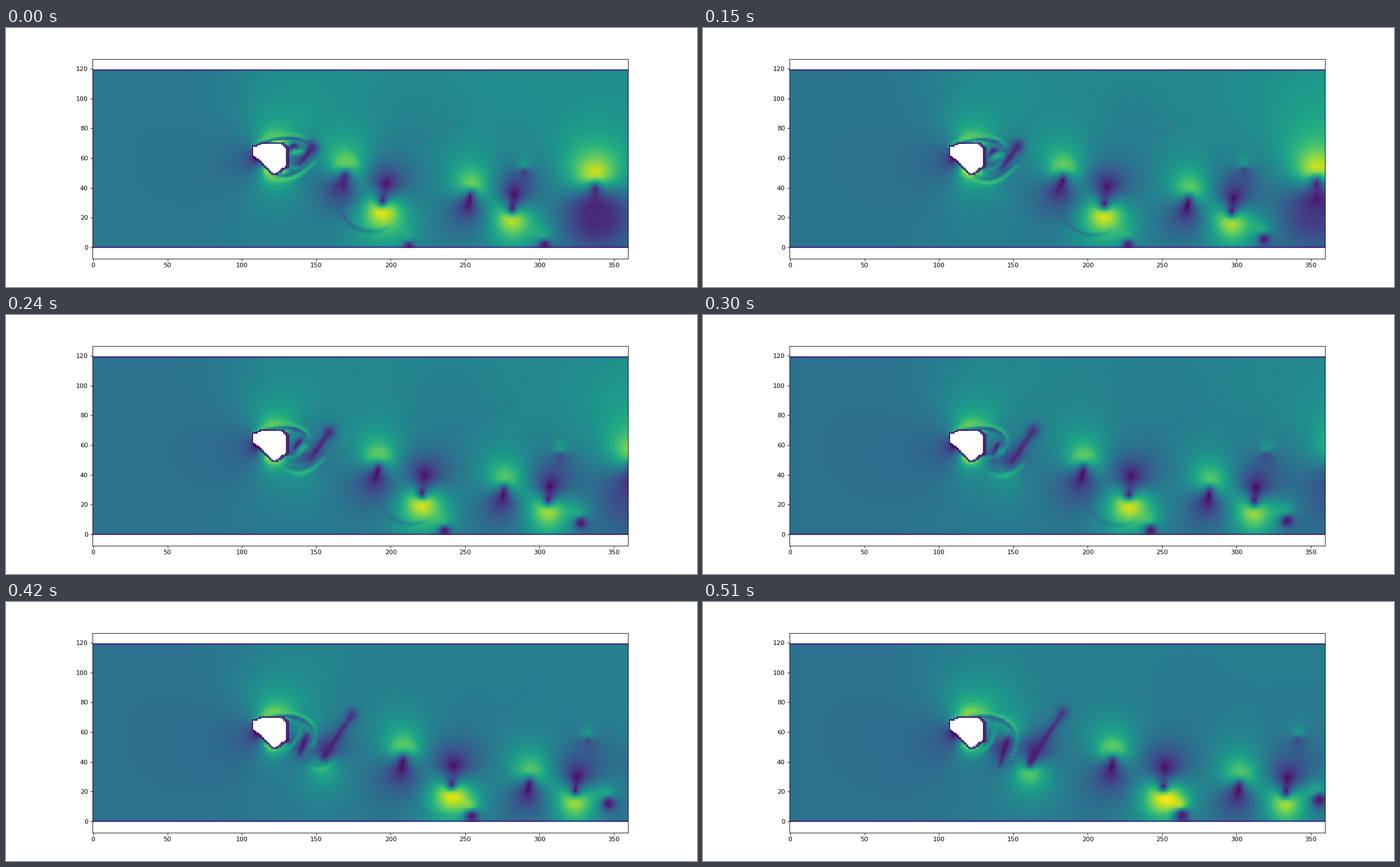
Animation, 1222 px wide and 458 px high, one loop 540 ms. Source, as a matplotlib script:

```python
import math
import numpy as np
import matplotlib.pyplot as plt
from matplotlib.animation import FuncAnimation
from matplotlib.path import Path

NX, NY, FRAMES, STEP = 360, 120, 18, 30
W, H, DPI = 1222, 458, 80
X, Y = np.meshgrid(np.arange(NX, dtype=float), np.arange(NY, dtype=float))

BODY = Path([(107.4, 67), (114.5, 69.6), (125.5, 69.6), (129.6, 65.7),
             (129.6, 55), (121.7, 49.3), (107.4, 62.3)])
SOLID = BODY.contains_points(np.c_[X.ravel(), Y.ravel()]).reshape(X.shape)
RIM = np.any([np.roll(SOLID, (dy, dx), (0, 1))
              for dx in (-1, 0, 1, 2) for dy in (-1, 0, 1)], axis=0)

# spin at start and end, core radius, x, y, drift per step
UPPER = (-1.0, -1.0, 6.8, 170, 51, 2.76, -0.44)
LOWER = (1.45, 1.6, 7, 194, 29, 3.32, -0.46)
VORTICES = [
    UPPER, LOWER,
    (-1.0, -1.0, 6.8, 254, 37.5, 2.82, -0.6),
    (1.3, 1.35, 6.8, 281, 23.5, 3.03, -0.38),
    (-1.45, 0, 8, 337, 42, 3.3, 0.9),
    (-0.4, -0.4, 2.5, 289.5, 53, 3.03, 0.25),
    (-0.2, -0.8, 3, 212, 4, 3, 0.2),
    (-0.4, -0.6, 3.5, 303, 5, 3.05, 0.75),
    (0.1, 1.1, 6, 124.5, 56.5, 2.14, -1.1),
    (0, -0.7, 6, 130, 60, 1.03, -0.15),
    (-0.1, -0.3, 11, 121, 58, 0, 0),
]


def mix(p, a, b):
    return a + (b - a) * p


def sigmoid(z):
    return 1 / (1 + np.exp(-z))


def centre(t, vortex):
    x, y, vx, vy = vortex[3:]
    return x + vx * t, y + vy * t


def blend(field, level, weight):
    field += (level - field) * weight


def blob(field, level, x, y, radius, alpha):
    r2 = (X - x)**2 + (Y - y)**2
    blend(field, level, max(alpha, 0) * np.exp(-r2 / radius**2))


def arc(field, level, x, y, radius, angle, width, alpha):
    """Soft arc around (x, y), strongest at the given angle."""
    off = np.hypot(X - x, Y - y) - radius
    turn = np.cos(np.arctan2(Y - y, X - x) - math.radians(angle))
    fade = np.clip(turn, 0, 1) ** 0.8
    blend(field, level, alpha * fade * np.exp(-off**2 / (2 * width**2)))


def stroke(field, pts, level, width, alpha):
    """Tapered Bezier stroke."""
    n = len(pts) - 1
    s = np.linspace(0, 1, 36)[:, None]
    line = sum(math.comb(n, k) * s**k * (1 - s)**(n - k) * q
               for k, q in enumerate(pts))
    x0, y0 = np.maximum(line.min(0) - 4 * width, 0).astype(int)
    x1, y1 = (line.max(0) + 4 * width).astype(int) + 1
    box = np.s_[y0:y1, x0:x1]
    r2 = ((X[box][..., None] - line[:, 0])**2
          + (Y[box][..., None] - line[:, 1])**2)
    taper = np.sin(np.pi * (0.06 + 0.88 * s[:, 0])) ** 0.4
    blend(field[box], level,
          alpha * (taper * np.exp(-r2 / (2 * width**2))).max(-1))


def velocity(t):
    # flow around the body, open towards the wake
    dx, dy = X - 121, Y - 60
    dx = np.where(dx > 0, dx / 1.5, dx)
    r2 = np.maximum(dx**2 + dy**2, 100)
    cos2, sin2 = (dx**2 - dy**2) / r2, 2 * dx * dy / r2
    side = np.maximum(-cos2, 0)
    u = 1 + 170 / r2 * np.where(dx > 0, side, np.maximum(-cos2, -0.75 * cos2))
    v = -130 / r2 * sin2 * np.where(dx > 0, side, 1)
    grow = (t / (FRAMES - 1)) ** 2
    for vortex in VORTICES:
        s0, s1, core = vortex[:3]
        cx, cy = centre(t, vortex)
        dx, dy = X - cx, Y - cy
        r2 = dx**2 + dy**2
        swirl = mix(grow, s0, s1) * 2 * core / (core**2 + r2)
        swirl *= np.exp(-r2 / (4.7 * core)**2)
        u -= swirl * dy
        v += swirl * dx
    return u, v * (1 - np.exp(-Y / 6))


def near_wake(field, p):
    """Shear layers rolling up behind the body, p from 0 to 1."""
    def morph(a, b):
        return mix(p, np.array(a, dtype=float), np.array(b, dtype=float))

    blob(field, 0.35, mix(p, 139, 142), 59, 9, mix(p, 0.8, 0.3))

    slash = morph([(138, 56), (143, 61), (147, 67)],
                  [(161, 38), (165, 47), (183, 73)])
    eye = morph([(132, 66), (135, 70), (137, 67)],
                [(141, 38), (143, 47), (146, 55)])
    top = morph([(107, 68), (116, 76), (136, 78), (143, 73)],
                [(107, 68), (122, 77), (164, 76), (149, 42)])
    bottom = morph([(118, 48), (133, 40), (149, 58)],
                   [(154, 33), (160, 29), (166, 35)])
    corner = morph([(131, 57), (135, 49), (144, 57)],
                   [(120, 47), (136, 44), (138, 65)])
    ring = morph([(131, 63), (136, 78), (143, 67)],
                 [(136, 62), (144, 72), (147, 55)])
    core = morph([(133, 63), (137, 65), (141, 64)],
                 [(147, 40), (150, 46), (150, 50)])

    stroke(field, slash, 0.2, 3.5, 0.45)
    blob(field, 0.12, *slash[-1], 4.5, mix(p, 0.85, 0.5))
    stroke(field, ring, 0.52, 1.1, mix(p, 0.6, 0.2))
    stroke(field, corner, 0.62, 1.1, mix(p, 0.6, 0.8))
    stroke(field, core, 0.76, 1.5, mix(p, 0.85, 0.1))
    stroke(field, top - (0, 2.4), 0.1, 0.9, 0.75)
    stroke(field, top, 0.72, 1.1, 0.8)
    stroke(field, bottom + (0, 2.6), 0.15, 0.9, mix(p, 0.6, 0))
    stroke(field, bottom, 0.74, 1.3, mix(p, 0.85, 0.2))
    stroke(field, slash, 0.07, 1.4, 0.85)
    stroke(field, eye, 0.05, 1.2, 0.88)


def far_wake(field, t, p):
    """Thin filaments and dark patches carried downstream."""
    x, y = centre(t, UPPER)
    arc(field, 0.76, x, y, 8.5, 95, 1.9, 0.5)
    arc(field, 0.56, x - 10, y, 21.5, 50, 1.1, mix(p, 0.45, 0.1))
    x, y = centre(t, LOWER)
    arc(field, 0.27, x - 7, y + 4, 22.5, 215, 1, mix(p, 0.6, 0.15))
    x = 200 + 3.6 * t
    stroke(field, np.array([(x, 64), (x + 25, 74), (x + 50, 86 + 0.5 * t)]),
           0.36, 1.2, 0.35)
    for vortex in VORTICES[6:8]:
        x, y = centre(t, vortex)
        blob(field, 0.05, x, y - 3.5, mix(p, 3.5, 4.5), 0.9)
    blob(field, 0.12, 339 + 2.3 * t, 19, 20, 1 - t / 13)


def speed(t):
    p = (t / (FRAMES - 1)) ** 1.5
    field = mix(min(t / 10, 1), 0.4, 0.376) * np.hypot(*velocity(t))
    field += mix(p, 0.07, 0.025) * sigmoid((Y - 70) / 12) * sigmoid((X - 110) / 14)
    field += 0.02 * sigmoid((X - 100) / 14)
    surge = 0.08 * math.exp(-((t - 6) / 4)**2)
    field += surge * np.exp(-((X - 365) / 55)**2 - ((Y - 95) / 40)**2)
    blob(field, 0.41, 215 + 3 * t, 88, 30, 0.5)
    far_wake(field, t, p)
    near_wake(field, p)
    field[[0, -1]] *= 0.45
    field[RIM] *= 0.25
    field[SOLID] = np.nan
    return np.clip(field, 0, 1)


fig, ax = plt.subplots(figsize=(W / DPI, H / DPI), dpi=DPI)
image = ax.imshow(speed(0), origin="lower", cmap="viridis", vmin=0, vmax=1,
                  aspect="auto", interpolation="nearest")
half = 0.77 * H * NX / (0.775 * W) / 2
ax.set_xlim(-0.5, NX - 0.5)
ax.set_ylim(59.5 - half, 59.5 + half)


def update(i):
    image.set_data(speed(i))
    return [image]


anim = FuncAnimation(fig, update, frames=FRAMES, interval=STEP, repeat=True)
plt.show()
```
